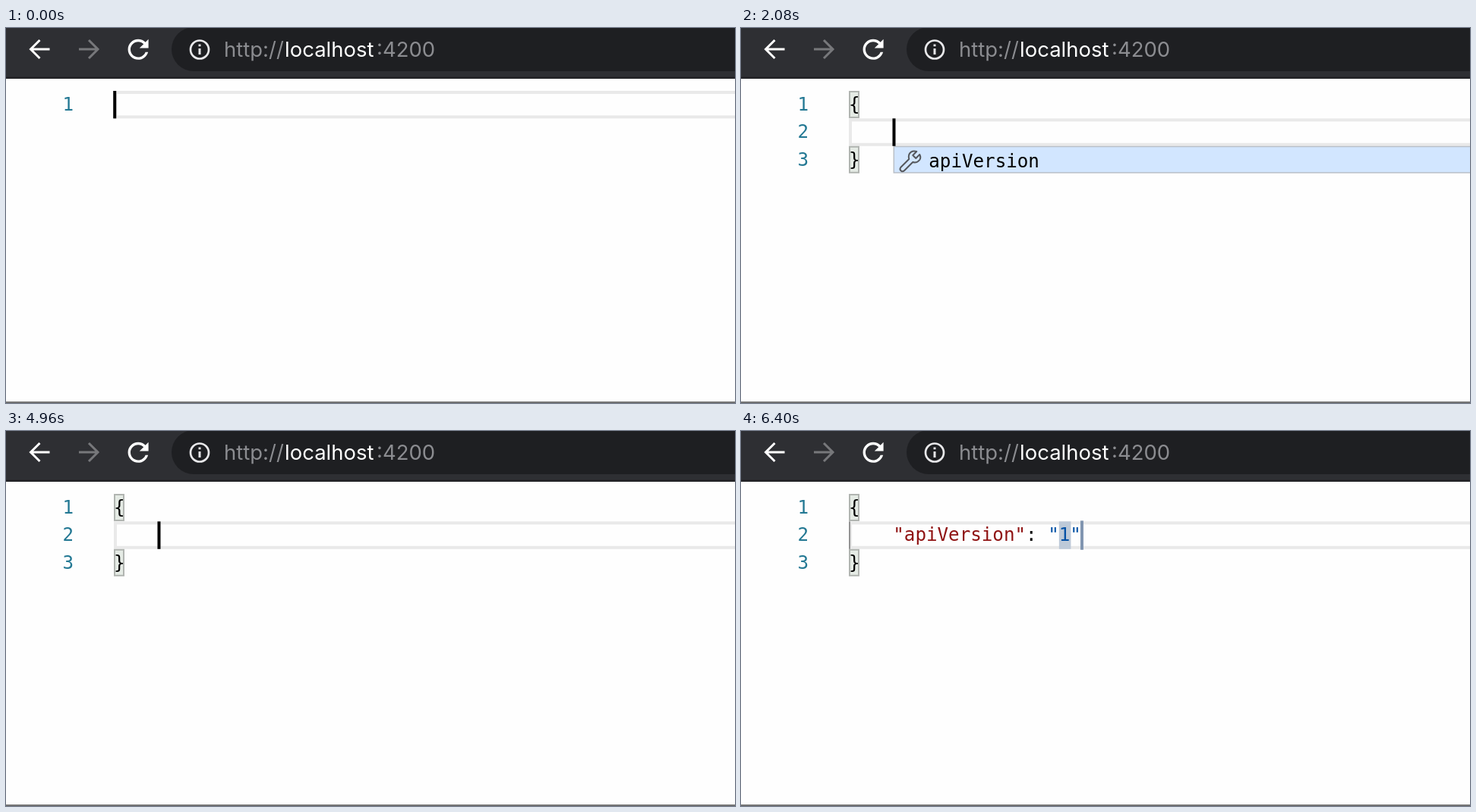
These frames come from a looping animation (960 by 495 pixels, 6480 ms). An HTML page:

```html
<!DOCTYPE html>
<html lang="en">
<head>
<meta charset="utf-8">
<title>Editor completion</title>
<style>
  html, body { margin: 0; width: 100%; height: 100%; overflow: hidden; background: #fefefe; }
  svg { display: block; width: 960px; height: 495px; }
  text { white-space: pre; }
  .url { font: 27.5px Inter, sans-serif; fill: #8b8c90; }
  #editor { font: 24.2px "DejaVu Sans Mono", monospace; }
  .number { fill: #237893; }
  .key { fill: #8f1212; }
  .value { fill: #0451a5; }
  .match { fill: #0a5cb8; font-weight: bold; }
</style>
</head>
<body>
<svg viewBox="0 0 960 495">
  <rect width="960" height="67" fill="#2e2f33"/>
  <rect y="64.5" width="960" height="2.5" fill="#222326"/>
  <rect x="218" y="-1" width="800" height="58" rx="29" fill="#1e1f22"/>
  <g fill="none" stroke-width="3">
    <path d="M57.500 28H33M44.500 16L32.500 28L44.500 40" stroke="#fff"/>
    <path d="M96 28H120.500M109 16L121 28L109 40" stroke="#77787b"/>
    <circle cx="255" cy="28.500" r="12" stroke="#e8e8ea" stroke-width="2.700"/>
    <path d="M255 27V35M255 21.500V24.300" stroke="#e8e8ea"/>
  </g>
  <path transform="translate(153.800 8) scale(1.690)" fill="#fff" d="M17.650 6.350C16.200 4.900 14.210 4 12 4c-4.420 0-7.990 3.580-7.990 8s3.570 8 7.990 8c3.730 0 6.840-2.550 7.730-6h-2.080c-.82 2.330-3.040 4-5.650 4-3.310 0-6-2.690-6-6s2.690-6 6-6c1.660 0 3.140.69 4.220 1.780L13 11h7V4z"/>
  <g class="url">
    <text x="287" y="38">http://</text>
    <text x="367" y="38" style="fill:#fff">localhost</text>
    <text x="488" y="38">:4200</text>
  </g>
  <g id="editor"></g>
  <rect y="493" width="960" height="2" fill="#747474"/>
</svg>
<script>
const LOOP = 6480, STEP = 80, BLINK = 500;
const LEFT = 142, TOP = 83, CHAR = 14.57, LINE = 36.4;
const PAIR = '<tspan class="key">"apiVersion"</tspan>: <tspan class="value">"1"</tspan>';

// Each step starts at `at`; `typed` restarts the caret blink and defaults to `at`.
const steps = [
  { at: 0, col: 0 },
  { at: 880, col: 1, inline: true },
  { at: 1060, col: 4, body: "" },
  { at: 2000, col: 4, body: "", popup: "", typed: 1060 },
  { at: 2160, col: 21, body: PAIR, marks: true },
  { at: 2640, col: 21, body: PAIR },
  { at: 4480, col: 4, body: PAIR, selected: true },
  { at: 4720, col: 4, body: "" },
  { at: 5200, col: 5, body: "a" },
  { at: 5280, col: 6, body: "ap" },
  { at: 5360, col: 7, body: "api" },
  { at: 5440, col: 7, body: "api", popup: "api", typed: 5360 },
  { at: 5760, col: 21, body: PAIR, marks: true }
];

const editor = document.getElementById("editor");
const colX = col => LEFT + col * CHAR;
const lineY = row => TOP + row * LINE;
const rect = (x, y, w, h, fill, extra = "") =>
  `<rect x="${x}" y="${y}" width="${w}" height="${h}" fill="${fill}" ${extra}/>`;
const text = (x, y, content, cls = "") =>
  `<text x="${x}" y="${y}" class="${cls}">${content}</text>`;
const code = (row, col, content) => text(colX(col), lineY(row) + 26, content);
const bracket = (row, col, char) =>
  rect(colX(col) + 1, lineY(row) + 1, 12, 34, "#e5ebe5", 'stroke="#b1b5b1" stroke-width="2"') +
  code(row, col, char);

function popup(col, match) {
  const x = colX(col) + 1;
  const label = `<tspan class="match">${match}</tspan>${"apiVersion".slice(match.length)}`;
  return rect(x, 156.5, 980 - x, 34.5, "#d2e6ff", 'stroke="#b9bfc7" stroke-width="1.5"') +
    `<path transform="translate(${x + 7} 161)" fill="none" stroke="#55585d" stroke-width="2"
      stroke-linejoin="round" d="M23 2Q16 0 13 6Q12 9 13 12L2 23Q0 26 3 28Q5 29 7 27L18 16Q23 18 27 13Q29 10 27 6L22 11L18 7Z"/>` +
    text(x + 46, 184, label);
}

function render(time) {
  const s = steps.findLast(step => step.at <= time);
  const open = s.body !== undefined;
  const row = open ? 1 : 0, y = lineY(row);
  let out = "";

  if (!s.selected)
    out += rect(LEFT + 2, y + 2, 840, 32.4, "none", 'stroke="#e9e9e9" stroke-width="4"');
  for (let i = 0; i < (open ? 3 : 1); i++)
    out += text(74.5, lineY(i) + 26, i + 1, "number");

  if (s.inline) out += bracket(0, 0, "{") + bracket(0, 1, "}");
  if (open) {
    out += bracket(0, 0, "{") + bracket(2, 0, "}");
    if (s.body) out += rect(LEFT, y, 2, LINE, "#939393");
    if (s.selected) out += rect(colX(4), y, 17 * CHAR, LINE, "#add6ff");
    if (s.marks)
      out += rect(colX(19), y, CHAR + 1, LINE, "#bdc9d8") +
        rect(colX(21) - 1, y - 1, 4, LINE + 2, "#8095b0");
    out += code(1, 4, s.body);
  }
  if (s.popup !== undefined) out += popup(s.col, s.popup);

  const idle = time - (s.typed ?? s.at);
  if (Math.floor(idle / BLINK) % 2 === 0) out += rect(colX(s.col) - 0.8, y, 4, LINE, "#000");
  editor.innerHTML = out;
}

let shown = -1;
function tick() {
  const time = Math.floor(performance.now() % LOOP / STEP) * STEP;
  if (time !== shown) render(shown = time);
  requestAnimationFrame(tick);
}
tick();
</script>
</body>
</html>
```
